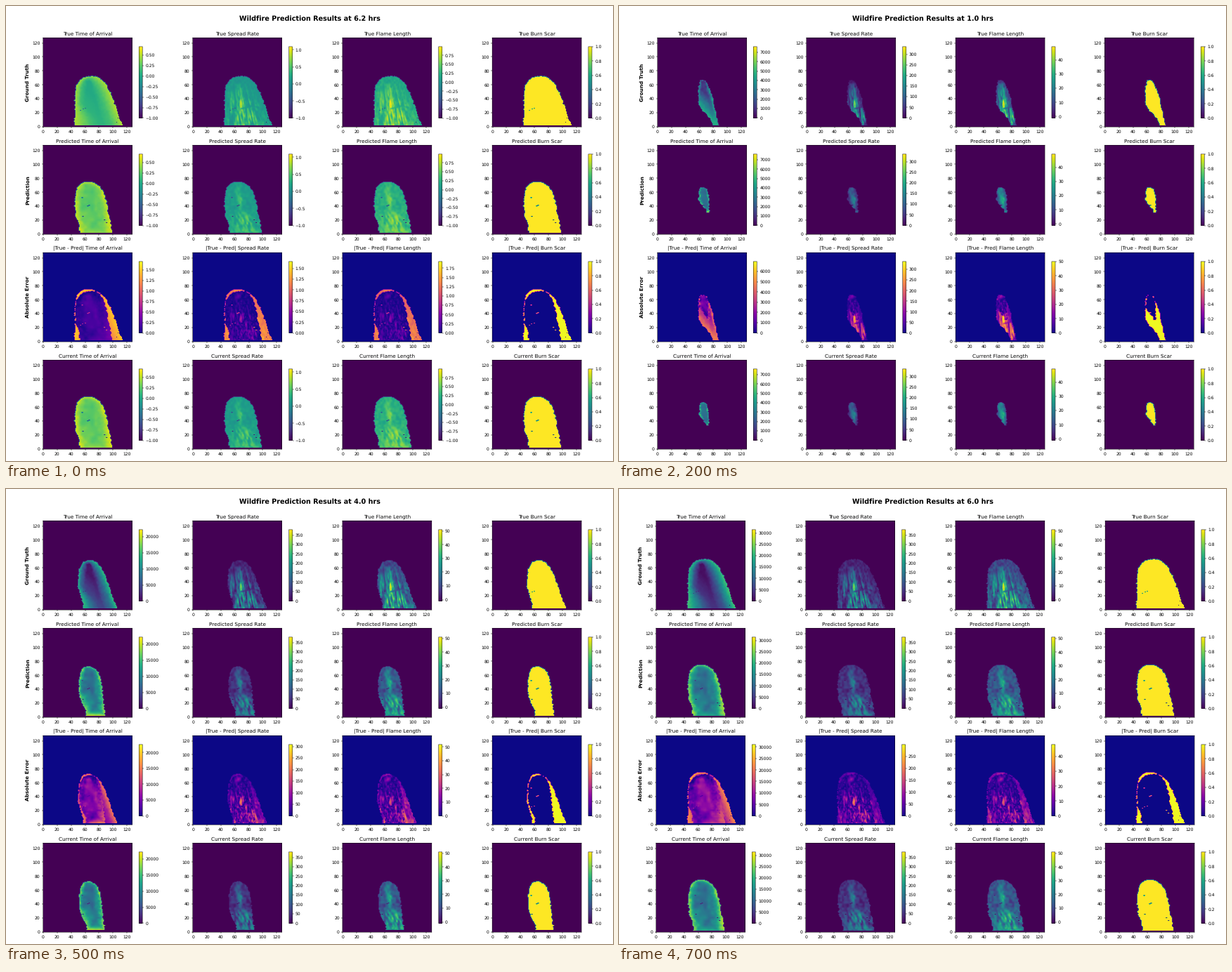
A matplotlib script that plays this animation: 864 px wide and 648 px high, repeating every 800 ms.

```python
import numpy as np
import matplotlib.pyplot as plt
from matplotlib.animation import FuncAnimation

plt.rcParams.update({"text.hinting": "none", "path.snap": False})

W, H, DPI = 864, 648, 43.2
HOURS = [6.2, 0, 1, 2, 3, 4, 5, 6]
LAG = 0.2  # the current state trails the prediction by this many hours

# Key silhouettes: hour, bottom, top, crown x, left foot, left side,
# right foot, right shoulder
TRUE_KEYS = [
    (0, 44, 66, 64.5, 70, 61.5, 72, 67),
    (1, 2, 67, 63, 79, 58, 87, 72),
    (2, 2, 69, 65, 69, 53.5, 97, 74),
    (6, 2, 72.5, 70, 45, 45, 113, 88)]
PRED_KEYS = [
    (-LAG, 54, 64, 64, 65, 63, 68, 65.5),
    (0, 43, 65, 64, 66, 62.5, 70.5, 68),
    (1, 31, 67, 62, 70, 59, 73, 73),
    (2, 10, 70, 65, 71, 56, 78.5, 76),
    (6, -6, 75, 64, 52, 45, 98, 85)]
TRUE_HOLES = [(53, 23), (57, 25), (60, 26), (105, 6), (107, 12)]
PRED_HOLES = [(63, 40), (65, 41), (55, 52), (56, 25), (87, 20), (90, 16)]

Y, X = np.mgrid[0:128, 0:128].astype(float)


def noise(seed, u, v):
    """Smooth value noise in 0..1, sampled at (u, v)."""
    grid = np.random.default_rng(seed).random((64, 64))
    i, j = np.floor(u).astype(int), np.floor(v).astype(int)
    a, b = u - i, v - j
    low = grid[i % 64, j % 64] * (1 - a) + grid[(i + 1) % 64, j % 64] * a
    high = grid[i % 64, (j + 1) % 64] * (1 - a) + grid[(i + 1) % 64, (j + 1) % 64] * a
    return low * (1 - b) + high * b


def bump(x, center, width):
    return np.exp(-((x - center) / width) ** 2)


def outline(keys, hour):
    """Rounded crown over a left side that tapers to a foot and a sloped right side."""
    hours, *params = np.transpose(keys)
    bottom, top, crown, foot_l, side_l, foot_r, side_r = (
        np.interp(hour, hours, p) for p in params)
    bottom = max(bottom, 2)
    level = np.clip((Y - bottom) / (top - bottom), 0, 1)
    cap = np.sqrt(1 - level ** 8)
    taper = np.clip(level / 0.5, 0, 1)
    taper = taper * taper * (3 - 2 * taper)
    left = foot_l + (side_l - foot_l) * taper
    right = foot_r + (side_r - foot_r) * level
    return bottom, top, crown + (left - crown) * cap, crown + (right - crown) * cap


def arrival_time(keys, seed, rough, holes, hole_width):
    """First hour at which each cell lies inside the growing outline."""
    arrival = np.full(X.shape, np.inf)
    shake = rough * (noise(seed, X / 2.2, Y / 2.2) - 0.5)
    for hour in np.arange(round(keys[0][0] * 20), 121) / 20:
        bottom, top, left, right = outline(keys, hour)
        inside = ((X >= left + shake) & (X <= right + shake)
                  & (Y >= bottom) & (Y <= top + shake))
        arrival[inside] = np.minimum(arrival[inside], hour)
    for x, y in holes:
        arrival[y, x:x + hole_width] = np.inf
    return arrival


true_arrival = arrival_time(TRUE_KEYS, 1, 2.6, TRUE_HOLES, 1)
pred_arrival = arrival_time(PRED_KEYS, 2, 3.4, PRED_HOLES, 2)

# Streaks fan out from the ignition area across the final outline
_, _, left, right = outline(TRUE_KEYS, 6)
fan = (X - left) / np.maximum(right - left, 1)
streak = 0.6 * noise(3, fan * 36, Y / 14) + 0.4 * noise(4, fan * 60, Y / 5)
heat = np.clip((streak - 0.36) * 2.3, 0, 1)
grain = noise(5, X / 2, Y / 3)

reach = bump(fan, 0.42, 0.2 + 0.2 * (1 - Y / 72)) * np.clip((64 - Y) / 25, 0, 1)
reach *= 1 - 0.75 * bump(Y, 27 + 2 * np.sin(X / 6), 1.5) * (fan > 0.4)
true_spread = 0.03 + 0.14 * grain + 0.72 * reach * heat

core = bump(X, 66 + (50 - Y) * 0.12, 3.5) * bump(Y, 50, 14)
lower = bump(fan, 0.45, 0.28) * np.clip((38 - Y) / 15, 0, 1)
pred_heat = np.clip(1.6 * noise(6, X / 2.5 + Y / 8, Y / 5) - 0.3, 0, 1)
pred_spread = (0.04 + 0.18 * noise(7, X / 2.5, Y / 3)
               + core * (0.25 + 0.4 * pred_heat) + 0.48 * lower * pred_heat)


def value_limits(hour):
    return (np.interp(hour, [0, 1, 2, 6], [4125, 7600, 12830, 31500]),
            np.interp(hour, [0, 1, 2, 4], [298, 337, 338, 379]),
            51 - 8 * np.exp(-1.5 * hour))


def error_limits(hour):
    return (np.interp(hour, [0, 1, 2, 4, 6], [4085, 6970, 11480, 22500, 31100]),
            np.interp(hour, [0, 1, 2, 6], [269, 337, 317, 299]),
            np.interp(hour, [0, 1, 4, 6], [43.7, 50, 51.8, 48.1]))


def layers(arrival, hour, time_share, spread, limits):
    burned = arrival <= min(hour, 6) + 1e-6
    flame = np.minimum(1.12 * spread ** 0.75, 0.97)
    fields = [np.where(burned, np.clip(share, 0, 1) * top, -1)
              for share, top in zip((time_share, spread, flame), limits)]
    return fields + [burned.astype(float)]


def pred_layers(hour, limits):
    age = np.clip(pred_arrival / max(hour, 0.3), 0, 1)
    share = 0.3 + 0.48 * age ** 2.5 + 0.16 * noise(8, X / 5, Y / 5)
    return layers(pred_arrival, hour, share, pred_spread, limits)


def all_layers(hour, limits):
    share = (1000 + 3500 * np.minimum(true_arrival, 6) + 500 * grain) / value_limits(hour)[0]
    true = layers(true_arrival, hour, share, true_spread, limits)
    pred = pred_layers(hour, limits)
    error = [np.abs(a - b) for a, b in zip(true, pred)]
    return [true, pred, error, pred_layers(hour - LAG, limits)]


fig = plt.figure(figsize=(W / DPI, H / DPI), dpi=DPI, facecolor="white")
heading = fig.suptitle("", fontsize=16, fontweight="bold", y=0.98)

ROWS = ["True {}", "Predicted {}", "|True - Pred| {}", "Current {}"]
LABELS = ["Ground Truth", "Prediction", "Absolute Error", ""]
COLUMNS = ["Time of Arrival", "Spread Rate", "Flame Length", "Burn Scar"]


def place(r, c, ax, cax, start, pitch):
    """Set a panel and its colour bar from pixel positions."""
    x, bottom = start + pitch * c, 172.2 + 153 * r
    ax.set_position([x / W, 1 - bottom / H, 127 / W, 127 / H])
    cax.set_position([(x + 136.8) / W, 1 - (bottom - 12.7) / H, 5.1 / W, 101.6 / H])


panels = {}
for r, prefix in enumerate(ROWS):
    for c, name in enumerate(COLUMNS):
        ax, cax = (fig.add_axes([0, 0, 0.1, 0.1], label=f"{kind}{r}{c}")
                   for kind in ("map", "bar"))
        place(r, c, ax, cax, 52.5, 213.2)
        image = ax.imshow(np.zeros((128, 128)), origin="lower", aspect="auto",
                          cmap="plasma" if r == 2 else "viridis", vmin=0, vmax=1)
        ax.set_xticks(range(0, 121, 20))
        ax.set_yticks(range(0, 121, 20))
        ax.set_title(prefix.format(name), fontsize=12)
        if c == 0 and LABELS[r]:
            ax.set_ylabel(LABELS[r], fontsize=12, fontweight="bold")
        fig.colorbar(image, cax=cax)
        panels[r, c] = ax, cax, image


def update(step):
    hour = HOURS[step]
    heading.set_text(f"Wildfire Prediction Results at {hour:.1f} hrs")
    normalized = hour > 6
    limits = (0.70, 1.09, 0.995) if normalized else value_limits(hour)
    errors = (1.70, 1.66, 1.93) if normalized else error_limits(hour)
    # Shorter time labels leave the columns slightly closer together
    start, pitch = (54.5, 212.3) if limits[0] > 1 and limits[0] < 10000 else (52.5, 213.2)
    data = all_layers(hour, limits)
    for (r, c), (ax, cax, image) in panels.items():
        place(r, c, ax, cax, start, pitch)
        image.set_data(data[r][c])
        if c < 3:
            image.set_clim(0 if r == 2 else -1, (errors if r == 2 else limits)[c])
    return []


anim = FuncAnimation(fig, update, frames=len(HOURS), interval=100,
                     repeat=True, repeat_delay=0, blit=False)
plt.show()
```
